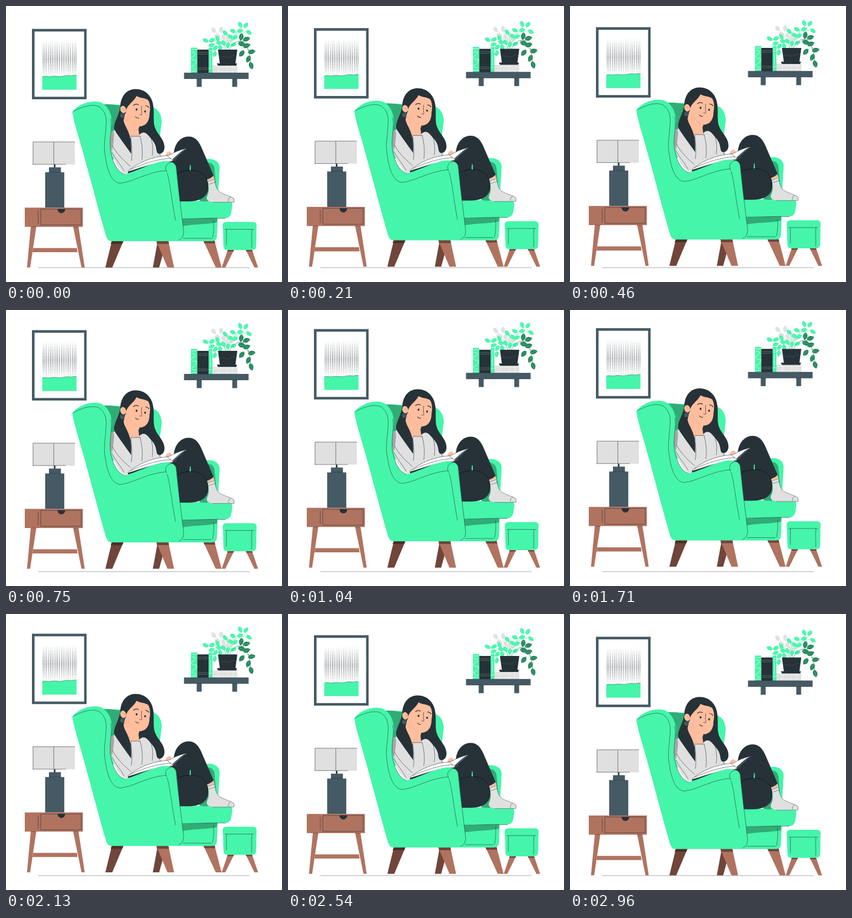
These frames come from a looping animation (500 by 500 pixels, 3000 ms). An HTML page with a canvas:

```html
<!DOCTYPE html>
<html lang="en">
<head>
<meta charset="utf-8">
<title>Reading chair</title>
<style>
html, body { margin: 0; width: 100%; height: 100%; overflow: hidden; background: #fff; }
canvas { display: block; width: 100vw; height: 100vh; }
</style>
</head>
<body>
<canvas id="stage"></canvas>
<script>
const LOOP = 3000, LIFT = 10, SIZE = 500;
const MINT = '#45f5aa', SHADE = '#31ac77', LEAF = '#25875d', INK = '#263238', SLATE = '#455a64';
const WOOD = '#b07360', WOOD_DIM = '#70453a', WOOD_DARK = '#4c2f28';
const GRAY = '#e0e0e0', GRAY_DIM = '#a6a6a6', SKIN = '#ffbe9d';

const canvas = document.getElementById('stage');
const ctx = canvas.getContext('2d');
const paths = new Map();

function path(d) {
  if (!paths.has(d)) paths.set(d, new Path2D(d));
  return paths.get(d);
}

function fill(d, color) {
  ctx.fillStyle = color;
  ctx.fill(path(d));
}

function line(d, color = INK, width = 0.6) {
  ctx.strokeStyle = color;
  ctx.lineWidth = width;
  ctx.stroke(path(d));
}

function box(x, y, w, h, color) {
  ctx.fillStyle = color;
  ctx.fillRect(x, y, w, h);
}

function dot(x, y, rx, ry, color, turn = 0) {
  ctx.fillStyle = color;
  ctx.beginPath();
  ctx.ellipse(x, y, rx, ry, turn, 0, Math.PI * 2);
  ctx.fill();
}

function leaf(x, y, degrees, len, color) {
  const h = len / 2;
  ctx.save();
  ctx.translate(x, y);
  ctx.rotate(degrees * Math.PI / 180);
  ctx.fillStyle = color;
  ctx.beginPath();
  ctx.moveTo(-h, 0);
  ctx.bezierCurveTo(-h * 0.5, -h * 0.85, h * 0.5, -h * 0.75, h, 0);
  ctx.bezierCurveTo(h * 0.4, h * 0.75, -h * 0.5, h * 0.75, -h, 0);
  ctx.fill();
  ctx.strokeStyle = '#ffffff88';
  ctx.lineWidth = 0.4;
  ctx.beginPath();
  ctx.moveTo(-h, 0);
  ctx.lineTo(h * 0.6, 0);
  ctx.stroke();
  ctx.restore();
}

function picture() {
  box(47, 41.5, 99, 127.5, SLATE);
  box(51.7, 46.2, 89.8, 118.2, '#fff');
  for (let i = 0; i < 19; i++) {
    const x = 67.2 + i * 3.31, top = 62 + Math.sin(i * 2.3) * 1.2;
    ctx.fillStyle = INK;
    ctx.beginPath();
    ctx.moveTo(x, top);
    ctx.lineTo(x + 0.36, 96);
    ctx.lineTo(x, 129);
    ctx.lineTo(x - 0.36, 96);
    ctx.fill();
  }
  fill('M65.7 128C72 126 76 129 82 127.5S94 128.5 100 127.5S109 125 115 126S122 124.5 127.7 125.5V151.7H65.7Z', MINT);
  line('M66 128C72 126 76 129 82 127.5S94 128.5 100 127.5S109 125 115 126S122 124.5 127.5 125.5', INK, 0.45);
}

function plant() {
  line('M399 82C395 66 387 53 376 43M398 76C399 62 396 50 390 43M401 80C402 67 406 59 412 54', '#cfcfcf', 0.7);
  [[376, 44, 55], [389.5, 43, 95], [383, 54, 15], [394, 57, 65], [402, 55, 100], [409, 61, 145], [401, 65, 70]]
    .forEach(([x, y, a]) => leaf(x, y, a, 12, GRAY));
  line('M402 80C407 60 416 47 431 35M399 80C394 64 381 60 363 63M399 78C386 70 380 75 378 88M405 63C403 55 398 51 394 49M413 52C423 50 430 45 438 47', MINT, 0.7);
  [[424, 34, 70], [434.5, 35, 125], [411, 45.5, 25], [424, 45, -15], [440, 48, 35], [397, 49, 50],
   [407, 56, 35], [415, 57, -30], [361.5, 62.5, 30], [373, 62, 150], [372.5, 71, -20], [383, 59, 60],
   [386, 67, 10], [379, 76, 130], [388, 76, 70], [378, 87, 105], [394, 67, 60], [402, 71, 100], [412, 70, -20]]
    .forEach(([x, y, a]) => leaf(x, y, a, 12, MINT));
  line('M404 81C411 62 430 57 436 73C441 84 443 94 444 108M421 65C430 66 434 61 438 59M438 79L446 82', LEAF, 0.7);
  [[426, 56, 100], [435.5, 60, -18], [427, 69, 15], [436, 72, -20], [445, 83, -12], [427, 86, 130],
   [439, 96, 115], [444, 108, 72]]
    .forEach(([x, y, a]) => leaf(x, y, a, 14, LEAF));
  fill('M384 79H419L415.5 105H387.5Z', INK);
  fill('M382 104H418.5L417 108H384Z', INK);
  line('M387 93C394 89 400 97 407 92S414 91 416 92', '#52616a', 0.5);
}

function shelf() {
  box(345.5, 131, 9, 15.5, SLATE);
  box(410, 131, 8.7, 15.5, SLATE);
  box(374, 108, 45, 13, GRAY);
  line('M376 111H418M376 118H418M385 109V120M401 109V120M411 109V120', '#f6f6f6', 0.7);
  box(335, 75.5, 11.4, 46, MINT);
  line('M336 79H345M336 118H345M337 84C344 82 345 89 339 91S338 100 343 98S344 107 339 108S338 115 344 114', '#fff', 0.7);
  box(346.5, 79, 20.7, 42.5, INK);
  line('M348 84H366M348 87H366M348 112H366M348 115H366', '#84908f', 0.55);
  box(367.2, 75.5, 6.8, 46, MINT);
  line('M368 81H373M368 85H373M368 113H373M370.5 89V109', '#fff', 0.7);
  plant();
  box(322.5, 121, 117, 11, SLATE);
  line('M323 121.2H439M323 131.8H439', INK, 0.4);
}

function lamp() {
  box(86.7, 286, 2.8, 7, INK);
  box(48.5, 246, 76.4, 41, GRAY);
  line('M49 287V246.2H124.6M86.6 247V286M49 286.8H108');
  box(78, 292.3, 21.5, 10, SLATE);
  box(71, 301.2, 34.3, 64.2, SLATE);
  line('M78 301H99M105 302V365M78.3 293V301', INK, 0.5);
}

function table() {
  fill('M45 399H55L43.7 473.7H38Z', WOOD);
  fill('M121.5 399H131.2L142.6 473.7H136.8Z', WOOD);
  fill('M49 438.5H128.5L129.6 446H48Z', WOOD);
  box(34, 365.3, 105.3, 34.7, WOOD);
  line('M58.3 371V394', INK, 0.6);
  line('M63.5 368H136.2V396.7H63.5Z', INK, 0.6);
  fill('M93.3 367.7H107.3A7 7.6 0 0 1 93.3 367.7Z', INK);
  line('M46 400H54M122 400H130', WOOD_DARK, 0.5);
}

function stool() {
  fill('M402 441H413.5L397.3 473.7H390.8Z', WOOD);
  fill('M434 441H445.5L456.7 473.7H450Z', WOOD);
  fill('M402 441H413.5L412 444.5H400.8ZM434 441H445.5L446.7 444.5H435.5Z', WOOD_DIM);
  fill('M399 391.3H448Q454 391.3 454 398C453 412 454 424 453 435Q453 442 446 442H401Q394 442 394 435C393 422 394 411 392.5 398Q392.5 391.3 399 391.3Z', MINT);
  line('M397 404.5H449M399.3 405V433M445.5 405C444 416 446 427 445 438');
}

function chairBack() {
  fill('M192 425H213L192.5 473.7H180Z', WOOD_DIM);
  fill('M192 425H213L210.6 431H189.5Z', WOOD_DARK);
  fill('M275 425H291L277.5 473.7H266Z', WOOD_DIM);
  fill('M275 425H291L289 431H273Z', WOOD_DARK);
  fill('M272 425H294L304.5 473.7H292.5Z', WOOD);
  fill('M272 425H294L295.3 431H274.5Z', WOOD_DIM);
  fill('M357 424H377.5L390.5 473.7H380Z', WOOD);
  fill('M357 424H377.5L379.2 430H359.5Z', WOOD_DIM);
  fill('M177 178C199 178 237 181 262 183C275 184 282 196 282 210C280 227 278 240 276 278H190Z', MINT);
  fill('M177 178C195 178 207 180 216 183L199 228L191 262L187 246Z', SHADE);
  fill('M361 278C370 275 386 278 387 292C386 314 384 338 384 356H358Z', MINT);
  fill('M364 284C372 283 378 288 378 298L381 334L370 356H350L357 300Z', SHADE);
  fill('M314 381H383.5C383 393 383 407 382 418.5Q381 426 373 426H311Z', MINT);
  fill('M315 382H383L382 392C361 396 340 395 318 399Z', SHADE);
  fill('M308 353.3H403Q411 354 410 362L408 375Q406 384 397 384.6C369 383.6 345 385.6 313 386.6Z', MINT);
  line('M318 385.6C345 385.6 370 383.6 397 384.6M376 389C377 403 376 411 374 420M321 421H372');
}

function legs() {
  fill('M362 338L371 336L366 354H355Z', SHADE);
  fill('M363 312L375 306L378 315L366 320Z', SKIN);
  fill('M366 317C371 316 374 314 378 313C379 323 381 332 387 337C396 342 405 344 412 348Q414 350 413 355.5H374C366 354 361 351 365 343C369 335 367 326 366 317Z', GRAY);
  line('M366 318L378 314C379 323 381 332 387 337C396 342 405 344 412 348Q414 350 413 355.5H374M368 323L379 319M403 354Q402 348 407 346', INK, 0.5);
  fill('M300 287L305 260C309 244 320 236 332 236.5C344 237 350 247 354 256L376 307C373 311 368 313 363 315L342 332L304 324Z', INK);
  fill('M333 289L334.5 288L335 299L332.5 300Z', MINT);
  fill('M307 304C323 298 340 295 353 302C365 309 368 323 365 337C361 348 349 354 330 354H309Z', INK);
  line('M310 303C325 297 341 295 353 302C365 309 367 322 364 336', '#0c1215', 0.8);
}

function torso() {
  fill('M200 222C192 226 189 237 189 253C192 275 202 294 216 305L286 278C278 267 275 249 267 237C261 227 248 222 238 221Z', GRAY);
  fill('M191 226C198 224 196 239 192 264C187 252 187 239 191 226Z', GRAY_DIM);
  line('M192 265C198 278 207 286 214 299M193 253C199 266 212 279 226 291M262 236C265 247 267 256 265 271M268 239C273 250 274 261 280 273', INK, 0.6);
}

function head() {
  fill('M234 150.5C217 151 208 165 207 181C206 198 192 214 197 225C205 238 215 251 227 268L240 235C251 222 257 234 266 244C274 254 271 263 275 267C282 270 288 263 287 254C286 242 278 236 272 225C265 213 269 198 267 182C265 162 251 150 234 150.5Z', INK);
  fill('M219 197L241 211L238 222L241 238H226Z', SKIN);
  fill('M236.5 163C231 174 221 177 217 190C218 203 226 216 240 218C253 219 260 209 260 195C262 184 261 175 257 170C250 166 243 167 236.5 163Z', SKIN);
  dot(212.3, 187.5, 5.2, 6.7, SKIN, -0.25);
  line('M209.8 186C212 184 215 187 214 190', '#d98c73', 0.6);
  dot(236.5, 187.5, 1.7, 2, INK);
  dot(252, 191, 1.6, 2, INK);
  line('M231 180Q235 176.5 240 179M253 180.5Q257 181 259 184', INK, 1.2);
  line('M245.7 181C244.8 188 246 193 246 197Q244 198 242 196.8', INK, 0.7);
  line('M234.5 200.5Q236.5 203.5 240.5 203', INK, 1.1);
  fill('M216 194C220 191 224 200 226 206L238 212C243 214 242 219 240 223L242 239H225C222 224 214 216 213 207Z', SKIN);
  line('M221 197L227 208M218 202L222 211M229 212L237 216', '#e59d80', 0.5);
  dot(210.7, 198.3, 4, 4.2, SLATE);
  line('M208 196Q211 194 213 198', INK, 0.7);
  fill('M225 236H243C246 252 249 269 246 283L225 291C227 273 228 252 225 236Z', GRAY);
  line('M226 237C228 254 229 269 227 280M243 236C247 251 248 267 246 278M226 236H243', INK, 0.6);
}

function book() {
  fill('M289 271C290 265 296 261 299 265L302 272Z', SKIN);
  fill('M301 274Q305 267 311 269Q311 275 307 279Q302 284 299 280Z', SKIN);
  fill('M221 300C248 292 273 282 301 281L327 258L301 285L221 303Z', INK);
  fill('M221 299C238 285 262 273 292 271C298 271 304 263 327 258C319 264 311 271 301 279C274 280 247 291 221 299Z', '#fff');
  fill('M327 258L303 280L301 278C309 271 317 262 327 258Z', SLATE);
  line('M221 299C238 285 262 273 292 271C298 271 304 263 327 258M226 296C250 285 275 277 299 276M292 271L300 278', INK, 0.6);
}

function chairFront() {
  fill('M120 192C128 181 145 172 163 173C179 173 191 189 192 210C191 228 187 245 189 263C193 282 200 299 215 305C234 300 254 289 280 282C296 279 309 283 309 296L315 354L322 410Q321 426 311 426H191Q184 426 181 416C164 357 148 294 132 239Q123 210 120 192Z', MINT);
  line('M122 191C138 182 156 177 168 182C180 190 183 202 181 220C180 240 176 254 180 273C184 304 194 321 208 321C232 318 255 301 290 298');
  line('M190 204C193 220 187 237 189 261C193 282 200 299 215 305');
  line('M291 301C286 291 292 283 302 283M292 303C297 318 299 345 307 388M308 289C310 313 313 336 316 360L322 410Q321 421 313 424');
}

function room() {
  picture();
  shelf();
  lamp();
  table();
  chairBack();
  legs();
  torso();
  head();
  book();
  chairFront();
  stool();
}

function resize() {
  const ratio = window.devicePixelRatio || 1;
  canvas.width = Math.round(innerWidth * ratio);
  canvas.height = Math.round(innerHeight * ratio);
}

function draw(now) {
  const phase = (now % LOOP) / LOOP;
  const lift = LIFT * (1 - Math.abs(1 - 2 * phase));
  ctx.setTransform(canvas.width / SIZE, 0, 0, canvas.height / SIZE, 0, 0);
  box(0, 0, SIZE, SIZE, '#fff');
  ctx.lineCap = ctx.lineJoin = 'round';
  line('M59 474H441', '#a3a8aa', 1);
  ctx.translate(0, -lift);
  room();
}

function tick() {
  draw(performance.now());
  requestAnimationFrame(tick);
}

addEventListener('resize', resize);
resize();
tick();
</script>
</body>
</html>
```
